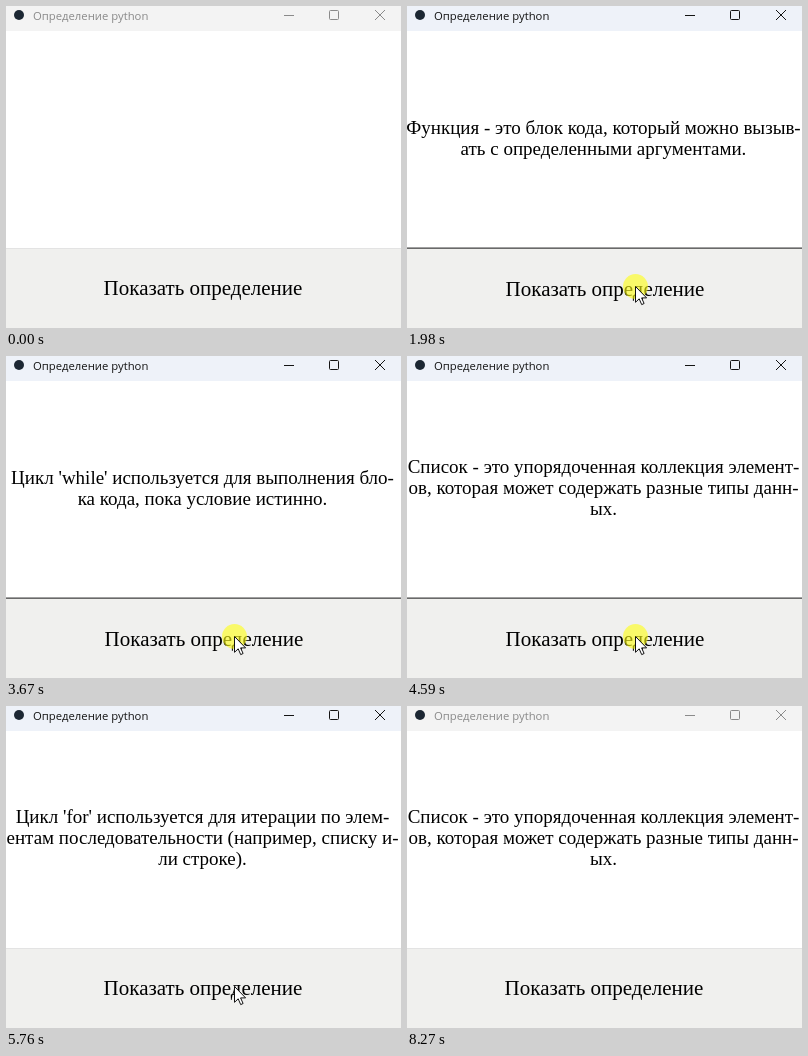
Recreate the animation shown at these times as an HTML page. Size 395 by 322 pixels, loop 8.32 s.

```html
<!DOCTYPE html>
<html lang="ru">
<head>
<meta charset="utf-8">
<title>Определение python</title>
<style>
  html, body { margin: 0; width: 100%; height: 100%; overflow: hidden; background: #fff; }
  svg { display: block; }
  .title { font: 11.3px "Open Sans", "Noto Sans", sans-serif; }
  .body, .label { font-family: "Liberation Serif", "Times New Roman", serif; text-anchor: middle; }
  .body { font-size: 19px; }
  .label { font-size: 21px; }
  .icons { fill: none; stroke-width: 1; }
</style>
</head>
<body>
<svg width="395" height="322" viewBox="0 0 395 322">
  <rect width="395" height="322" fill="#fff"/>
  <rect id="bar" width="395" height="25"/>
  <circle cx="13" cy="9" r="5" fill="#1c2733"/>
  <text id="title" class="title" x="27" y="14">Определение python</text>
  <g id="icons" class="icons">
    <path d="M278 9.5h10"/>
    <rect x="323.5" y="4.5" width="9" height="9" rx="1"/>
    <path d="M369 4l10 10M379 4l-10 10"/>
  </g>
  <g id="body" class="body"></g>
  <rect y="241" width="395" height="81" fill="#f0f0ee"/>
  <rect id="edge1" y="241" width="395" height="1"/>
  <rect id="edge2" y="242" width="395" height="1"/>
  <text id="label" class="label" x="197" y="289">Показать определение</text>
  <circle id="glow" cx="228.5" cy="280.5" r="12.5" fill="#ffff10" opacity=".6"/>
  <path id="cursor" d="M.5 .5V16.3L4.2 12.8 6.7 18.6 9.1 17.5 6.6 11.9H11.6Z"
        fill="#fff" stroke="#111" stroke-width="1" stroke-linejoin="round"/>
</svg>
<script>
const LOOP = 8320;
const $ = id => document.getElementById(id);

const func = ["Функция - это блок кода, который можно вызыв-", "ать с определенными аргументами."];
const whileLoop = ["Цикл 'while' используется для выполнения бло-", "ка кода, пока условие истинно."];
const list = ["Список - это упорядоченная коллекция элемент-", "ов, которая может содержать разные типы данн-", "ых."];
const forLoop = ["Цикл 'for' используется для итерации по элем-", "ентам последовательности (например, списку и-", "ли строке)."];

// Each click: mouse down, button sinks, mouse up, button rises with a new text
const clicks = [
  [1060, 1100, 1300, 1300, func],
  [1930, 1980, 2150, 2180, forLoop],
  [2760, 2760, 3090, 3090, whileLoop],
  [3670, 3670, 4050, 4100, list],
  [4590, 4590, 4950, 4950, func],
  [5300, 5300, 5760, 5760, forLoop],
  [6340, 6340, 6830, 6830, list]
];

const clamp = v => Math.max(0, Math.min(1, v));
const mix = (a, b, k) => a + (b - a) * k;
const blend = (a, b, k) => `rgb(${a.map((v, i) => Math.round(mix(v, b[i], k)))})`;
const show = (el, on) => el.setAttribute("visibility", on ? "visible" : "hidden");
const within = (t, a, b) => t >= a && t < b;

let shown = null;
function setBody(lines) {
  if (lines === shown) return;
  shown = lines;
  const first = lines.length === 3 ? 117 : 128;
  $("body").innerHTML = lines.map((s, i) => `<text x="196.5" y="${first + 21 * i}">${s}</text>`).join("");
}

function cursorAt(t) {
  if (t < 280 || t >= 7610) return null;
  if (t < 840) {
    const k = (Math.floor((t - 280) / 40) + 1) / 15;
    const e = 1 - (1 - k) ** 2;
    return [mix(316, 229, e), mix(324, 281, e)];
  }
  if (t < 1060) return [229, 281];
  if (t < 7180) return [228, 280];
  const k = (Math.floor((t - 7180) / 39) + 1) / 12;
  const e = k ** 1.7;
  return [mix(228, 308, e), mix(280, 324, e)];
}

function paintTitle(t) {
  const step = Math.floor(t / 40) * 40;
  const k = t < 4000 ? clamp((step - 1040) / 200) : 1 - clamp((t - 8060) / 210);
  $("bar").setAttribute("fill", blend([243, 243, 243], [238, 242, 249], k));
  $("title").setAttribute("fill", blend([138, 138, 138], [20, 20, 20], k));
  $("icons").setAttribute("stroke", blend([138, 138, 138], [20, 20, 20], k));
}

function render(t) {
  const down = clicks.some(c => within(t, c[1], c[3]));
  const last = clicks.filter(c => t >= c[3]).pop();
  setBody(last ? last[4] : []);
  show($("glow"), clicks.some(c => within(t, c[0], c[2])));
  $("edge1").setAttribute("fill", down ? "#a0a0a0" : "#fff");
  $("edge2").setAttribute("fill", down ? "#696969" : "#e3e3e3");
  $("label").setAttribute("transform", down ? "translate(1 1)" : "");
  paintTitle(t);

  const pos = cursorAt(t);
  show($("cursor"), pos);
  if (pos) $("cursor").setAttribute("transform", `translate(${pos.map(Math.round)})`);
}

const start = performance.now();
function tick() {
  render((performance.now() - start) % LOOP);
  requestAnimationFrame(tick);
}
tick();
</script>
</body>
</html>
```
